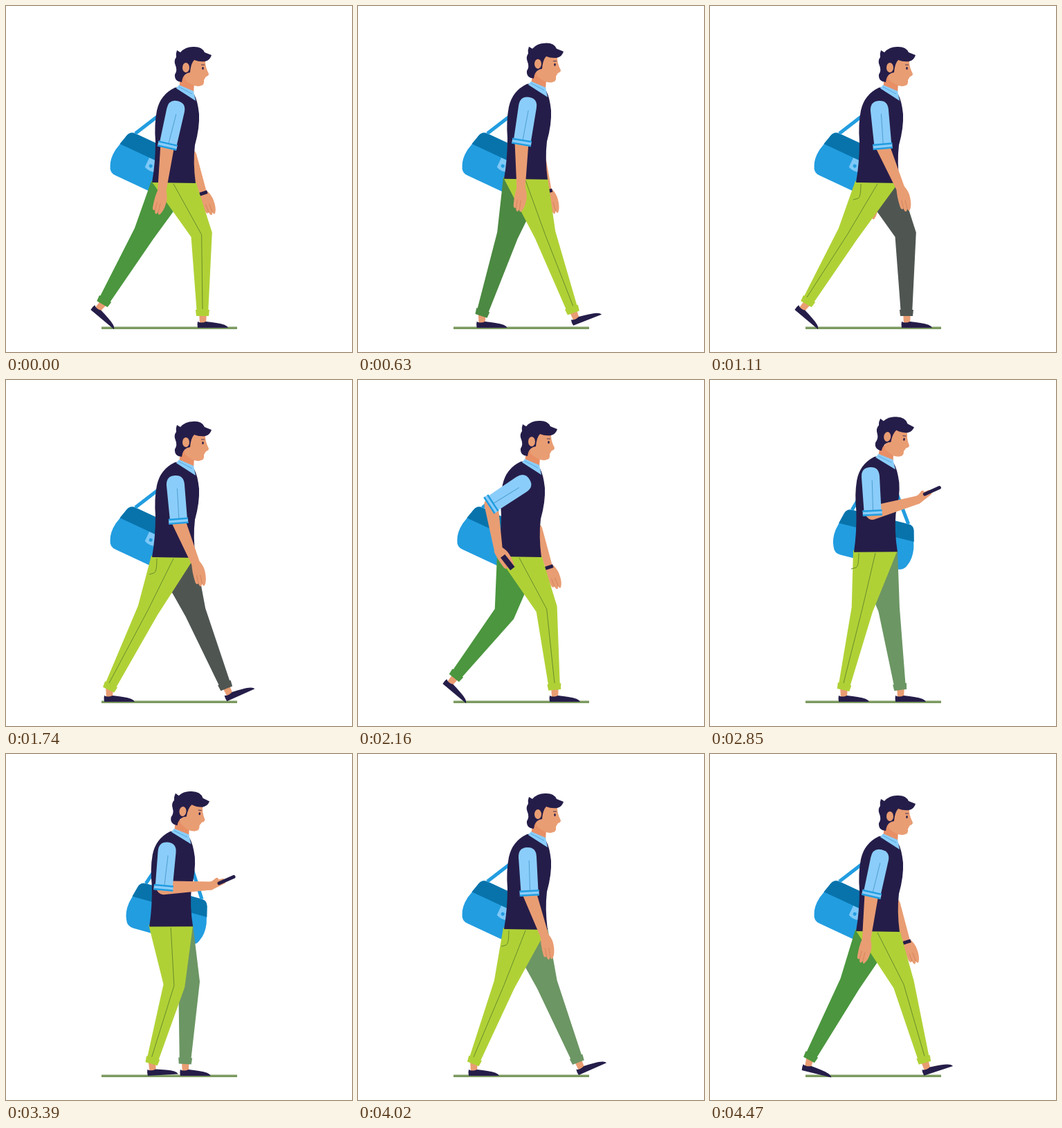
Recreate the animation shown at these times as an HTML page with a canvas. Size 500 by 500 pixels, loop 4500 ms.

```html
<!DOCTYPE html>
<html lang="en">
<head>
<meta charset="utf-8">
<title>Walking with a phone</title>
<style>
  html, body { margin: 0; height: 100%; overflow: hidden; background: #fff; }
  canvas { display: block; width: 500px; height: 500px; }
</style>
</head>
<body>
<canvas id="stage" width="500" height="500"></canvas>
<script>
const ctx = document.getElementById('stage').getContext('2d');
const LOOP = 4500, STEP = 30;
const NAVY = '#251d49', SKIN = '#e99d73', SHIRT = '#8bcdfa', BLUE = '#229de0',
      DEEP = '#0873ab', LIME = '#b0d136', SEAM = '#668d2b';

// Time in ms and walk cycles completed by then
const PACE = [[0, 0], [1110, 1.5], [1740, 2.45], [2160, 3], [2850, 3.5], [4020, 4.39], [LOOP, 5]];

const rad = d => d * Math.PI / 180;
const mix = (a, b, k) => a + (b - a) * k;
const mixAll = (a, b, k) => a.map((v, i) => mix(v, b[i], k));
const ramp = (v, a, b) => Math.max(0, Math.min(1, (v - a) / (b - a)));
const ease = k => k * k * (3 - 2 * k);
const bump = (t, a, b, c, d) => ease(ramp(t, a, b)) * (1 - ease(ramp(t, c, d)));

function cyclesAt(t) {
  const i = PACE.findIndex(key => key[0] > t), [t0, c0] = PACE[i - 1], [t1, c1] = PACE[i];
  return mix(c0, c1, ramp(t, t0, t1));
}

function shape(d, color) {
  ctx.fillStyle = color;
  ctx.fill(new Path2D(d));
}

function line(d, color, width) {
  ctx.strokeStyle = color;
  ctx.lineWidth = width;
  ctx.stroke(new Path2D(d));
}

function oval(x, y, rx, ry, color) {
  ctx.beginPath();
  ctx.ellipse(x, y, rx, ry, 0, 0, 7);
  ctx.fillStyle = color;
  ctx.fill();
}

function placed(x, y, angle, draw) {
  ctx.save();
  ctx.translate(x, y);
  ctx.rotate(rad(angle));
  draw();
  ctx.restore();
}

// Hangs down from a joint; positive angles swing forward
const reach = (p, length, angle) => [p[0] + length * Math.sin(rad(angle)), p[1] + length * Math.cos(rad(angle))];

function taper(a, ra, b, rb, color) {
  const turn = Math.atan2(b[1] - a[1], b[0] - a[0]), q = Math.PI / 2;
  ctx.beginPath();
  ctx.arc(...a, ra, turn + q, turn - q);
  ctx.arc(...b, rb, turn - q, turn + q);
  ctx.fillStyle = color;
  ctx.fill();
}

// Ankle x, y and foot angle: glide back, roll off the toe, swing forward, land on the heel
function foot(q) {
  const roll = ramp(q, .455, .475), swing = ease(ramp(q, .5, .9)), land = ramp(q, .95, 1);
  return [
    284 - 300 * Math.min(q, .46) - 6 * roll + 178 * swing - 34 * land,
    446 - 17 * roll + 15 * swing + 2 * land - 14 * Math.sin(Math.PI * swing),
    40 * roll - 64 * swing + 24 * land
  ];
}

function knee(hip, ankle) {
  const thigh = 84, shin = 115.5, dx = ankle[0] - hip[0], dy = ankle[1] - hip[1], d = Math.hypot(dx, dy);
  const reached = Math.min(d, thigh + shin);
  const along = (thigh ** 2 - shin ** 2 + reached ** 2) / (2 * reached);
  const out = Math.sqrt(Math.max(0, thigh ** 2 - along ** 2));
  return [hip[0] + (dx * along + dy * out) / d, hip[1] + (dy * along - dx * out) / d];
}

function leg(hip, [x, y, angle], color, near) {
  placed(x, y, angle, () => {
    shape('M-5-4H6L5 13H-4Z', SKIN);
    shape('M-7 10Q-2 13 5 10Q14 11 20 12Q35 14 37 19H-7Q-8 14-7 10Z', NAVY);
  });
  const k = knee(hip, [x, y]);
  const turn = Math.atan2(y - k[1], x - k[0]) - Math.PI / 2;
  const bend = Math.atan2(y - hip[1], x - hip[0]) - Math.PI / 2;
  const ax = 8 * Math.cos(turn), ay = 8 * Math.sin(turn);
  const kx = 15.5 * Math.cos(bend), ky = 15.5 * Math.sin(bend);
  shape(`M${hip[0] - 32} ${hip[1] - 4}L${k[0] - kx} ${k[1] - ky}L${x - ax} ${y - ay}
    L${x + ax} ${y + ay}L${k[0] + kx} ${k[1] + ky}L${hip[0] + 32} ${hip[1] - 4}Z`, color);
  placed(x, y, turn * 180 / Math.PI, () => shape('M-10-7H10L9 2H-9Z', color));
  if (!near) return;
  line(`M${hip[0]} ${hip[1]}L${k[0]} ${k[1]}L${x} ${y - 8}`, SEAM, 1);
  if (k[0] < hip[0]) line(`M${hip[0] - 24} ${hip[1]}q0 20-4 21l-7 2`, SEAM, 1);
}

function bag(x, y, angle, lean) {
  placed(x, y, angle, () => {
    shape('M-42-33H42Q50-33 52-25L58 0Q60 15 55 25Q52 34 42 34H-42Q-52 34-55 25Q-60 15-58 0L-52-25Q-50-33-42-33Z', BLUE);
    shape('M-42-33H42Q50-33 52-25L56-10H-56L-52-25Q-50-33-42-33Z', DEEP);
    shape('M-9-10H8V5Q0 9-9 5Z', '#7ec8f7');
    oval(-2, 0, 2.5, 2.5, BLUE);
  });
  const c = Math.cos(rad(angle)), s = Math.sin(rad(angle));
  for (const [from, to] of [[-42, 230], [42, 268]])
    line(`M${x + from * c + 33 * s} ${y + from * s - 33 * c}L${to + lean} 151`, BLUE, 5);
}

function hand(wrist, angle) {
  placed(...wrist, -angle, () => {
    shape('M-6-3H6Q10 6 9 14Q8 26 3 32Q0 34 0 29L-2 32Q-5 33-5 27Q-9 29-9 23Q-9 8-6-3Z', SKIN);
    line('M1 16L0 29M-4 15L-5 27', '#ce7d56', .7);
  });
}

function farArm(swing, x, y) {
  const elbow = reach([250 + x, 150 + y], 67, 3 + 12 * swing), angle = 6 + 12 * swing;
  const wrist = reach(elbow, 59, angle);
  taper(elbow, 8, wrist, 5, SKIN);
  hand(wrist, angle + 8);
  placed(...wrist, -angle, () => shape('M-6-4H6V1H-6Z', NAVY));
}

function nearArm(shoulder, [upper, fore, palm], phone) {
  const cuff = reach(shoulder, 52, upper), wrist = reach(cuff, 68, fore);
  const raised = palm > 80;
  taper(cuff, 10, wrist, 6, SKIN);
  if (raised) {
    taper(wrist, 6, reach(wrist, 19, palm), 4, SKIN);
    taper(wrist, 4, reach(wrist, 13, palm + 25), 2.5, SKIN);
  } else hand(wrist, palm);
  if (phone) placed(...reach(wrist, raised ? 24 : 21, palm), raised ? -24 : 52, () => {
    ctx.lineCap = raised ? 'round' : 'butt';
    line('M-11 0H12', NAVY, raised ? 5 : 8);
  });
  placed(...shoulder, -upper, () => {
    shape('M-13 0Q-13-14 0-14T13 0L13 53H-12Z', SHIRT);
    line('M2 5L1 49', '#4c9fd0', 1);
    shape('M-14 48H14V56H-14Z', SHIRT);
    line('M-14 49H14M-14 55H14', BLUE, 2.5);
  });
}

function head(tilt) {
  shape('M253 96L250 118L271 126L272 110Z', '#e88f66');
  placed(258, 114, tilt, () => {
    ctx.translate(-258, -114);
    shape('M259 74L288 74Q287 86 293 97Q293 100 289 101L286 106Q287 113 282 114Q272 118 258 105Z', SKIN);
    shape('M246 73Q245 68 247 63L252 66Q259 58 270 58Q283 57 287 66L297 70Q295 77 288 79Q279 80 272 77Q267 82 266 95L262 96Q255 99 254 109Q243 108 244 98Q248 92 245 85Q242 78 246 73Z', NAVY);
    oval(260, 88, 5, 7, SKIN);
    oval(284.5, 89, 1.3, 2, NAVY);
    line('M282 84H287', NAVY, .8);
  });
}

function torso() {
  shape('M244 117Q223 127 218 150Q214 170 216 195Q216 225 211 254L274 255Q270 225 273 200Q280 175 279 155Q277 136 272 127L252 116Z', NAVY);
  shape('M250 113L271 122L274 136L246 118Z', SHIRT);
  line('M250 116L269 126', '#55a9dc', 1);
}

function draw(t) {
  const phase = cyclesAt(t) % 1;
  const swing = Math.cos(2 * Math.PI * phase);
  const pocket = bump(t, 1850, 2160, 3680, 4000);
  const reading = bump(t, 2160, 2650, 3300, 3680);

  const bob = 8 * Math.cos(4 * Math.PI * (phase + .04)) - 6;
  const x = mix(-9 * pocket, -3, reading), y = mix(bob, -6, reading);
  const hip = [242 + x, 256 + y];
  const nearFoot = mixAll(foot(phase), [193, 446, 0], reading);
  const farFoot = mixAll(foot((phase + .5) % 1), [275, 446, 0], reading);
  const ahead = mixAll([79, 86, 82], [108, 150, 100], ease(ramp(t, 1740, 2850)));
  const shade = mixAll([75, 150, 62], ahead, ease(ramp(farFoot[0], 150, 250))).map(Math.round);

  ctx.fillStyle = '#fff';
  ctx.fillRect(0, 0, 500, 500);
  line('M138 465.3H334', '#7c9a5f', 3.6);
  farArm(swing * (1 - reading), x, y);
  bag(...mixAll([211 + .8 * x, 232, 25], [238, 230, 14], reading), x);
  leg(hip, farFoot, `rgb(${shade})`, false);
  leg(hip, nearFoot, LIME, true);
  const lean = -1.5 * reading;
  placed(...hip, lean, () => {
    ctx.translate(-242, -256);
    head(8 * reading);
    torso();
  });

  const walking = [-4 - 9 * swing, 8 - 15 * swing, 4 - 14 * swing];
  const arm = mixAll(mixAll(walking, [-57, 9, 38], pocket), [3, 106, 122], reading);
  nearArm([245 + x - 10 * reading, 150 + y - 4 * reading], arm, t >= 2100 && t < 3700);
}

const start = performance.now();
function tick() {
  const t = (performance.now() - start) % LOOP;
  draw(Math.floor(t / STEP) * STEP);
  requestAnimationFrame(tick);
}
tick();
</script>
</body>
</html>
```
